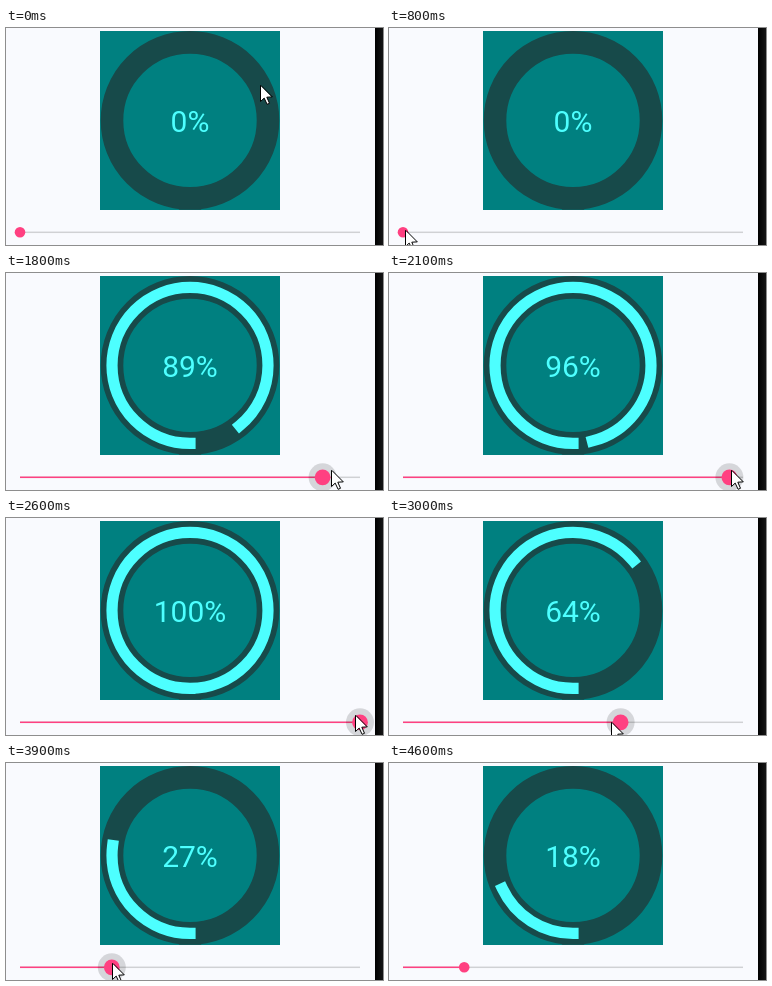
Animation, 377 px wide and 217 px high, one loop 5 s. Source, as an HTML page with a canvas:

```html
<!DOCTYPE html>
<html lang="en">
<head>
<meta charset="utf-8">
<title>Progress ring with slider</title>
<style>
  html, body { margin: 0; width: 100%; height: 100%; overflow: hidden; background: #f9fafe; }
  canvas { display: block; width: 377px; height: 217px; }
</style>
</head>
<body>
<canvas id="stage" width="377" height="217"></canvas>
<script>
const ctx = document.getElementById('stage').getContext('2d');
const W = 377, H = 217, LOOP = 5000, STEP = 100;
const CX = 184, CY = 92.4, RADIUS = 78;
const TRACK = { x: 14, y: 204.3, w: 340 };
const CYAN = '#4dffff', PINK = '#ff4081';
const GRAB = 800, RELEASE = 4200;

// Turning points of the drag: pointer lead is measured from the thumb
const drag = [
  { t: 900, percent: 0, lead: 2, y: 202 },
  { t: 1400, percent: 48, lead: 8, y: 199 },
  { t: 1500, percent: 38, lead: 4, y: 199 },
  { t: 1800, percent: 89, lead: 8, y: 197 },
  { t: 2300, percent: 100, lead: -3, y: 197 },
  { t: 2600, percent: 100, lead: -5, y: 197 },
  { t: 3000, percent: 64, lead: -9.6, y: 204 },
  { t: 3400, percent: 32, lead: -8, y: 202 },
  { t: 3600, percent: 32, lead: -8, y: 202 },
  { t: 3900, percent: 27, lead: 0, y: 200 },
  { t: RELEASE, percent: 18, lead: -2, y: 198 }
];

const mix = (a, b, u) => a + (b - a) * u;
const ramp = (t, from, to) => Math.min(1, Math.max(0, (t - from) / (to - from)));
const smoother = u => u * u * u * (u * (6 * u - 15) + 10);
const thumbX = percent => TRACK.x + TRACK.w * percent / 100;

function dragAt(t, key) {
  const n = Math.max(1, drag.findIndex(k => k.t >= t));
  const end = t > RELEASE ? drag.length - 1 : n;
  const a = drag[end - 1], b = drag[end];
  return mix(a[key], b[key], ramp(t, a.t, b.t));
}

const percentAt = t => Math.round(dragAt(t, 'percent'));

function pointerAt(t) {
  if (t < GRAB) {
    const u = smoother(ramp(t, 0, 700));
    return [mix(254, 16, u), mix(57, 202, u)];
  }
  const x = thumbX(percentAt(t)) + dragAt(t, 'lead');
  const y = dragAt(t, 'y');
  // After release the pointer speeds up and leaves the stage
  const u = Math.max(0, (t - RELEASE) / 300) ** 2;
  return [mix(x, 366, u), mix(y, 64, u)];
}

function disc(x, y, r, color) {
  ctx.fillStyle = color;
  ctx.beginPath();
  ctx.arc(x, y, r, 0, Math.PI * 2);
  ctx.fill();
}

function bar(from, to, color) {
  ctx.fillStyle = color;
  ctx.fillRect(from, TRACK.y - 0.75, to - from, 1.5);
}

function arc(percent, width, color) {
  const start = Math.PI / 2;
  ctx.strokeStyle = color;
  ctx.lineWidth = width;
  ctx.lineCap = 'square';
  ctx.beginPath();
  ctx.arc(CX, CY, RADIUS, start, start + Math.PI * 2 * percent / 100);
  ctx.stroke();
}

function drawBackground() {
  ctx.fillStyle = '#f9fafe';
  ctx.fillRect(0, 0, W, H);
  const edge = ctx.createLinearGradient(369, 0, W, 0);
  edge.addColorStop(0, '#000');
  edge.addColorStop(1, '#161616');
  ctx.fillStyle = edge;
  ctx.fillRect(369, 0, W - 369, H);
}

function drawRing(percent) {
  ctx.fillStyle = '#008080';
  ctx.fillRect(94, 3, 180, 179);
  arc(100, 22.6, '#174a4a');
  if (percent > 0) arc(percent, 11.2, CYAN);
  ctx.fillStyle = CYAN;
  ctx.font = '30px Roboto, sans-serif';
  ctx.textAlign = 'center';
  ctx.fillText(percent + '%', CX, 104.3);
}

function drawSlider(percent, press) {
  const x = thumbX(percent);
  bar(TRACK.x, TRACK.x + TRACK.w, '#d0d1d4');
  bar(TRACK.x, x, PINK);
  disc(x, TRACK.y, 14 * press, 'rgba(0, 0, 0, 0.14)');
  disc(x, TRACK.y, 5.3 + 2.6 * press, PINK);
}

function drawPointer(x, y) {
  const outline = [[0, 0], [0, 16], [3.7, 12.6], [6.6, 18.8], [9, 17.8], [6.3, 11.7], [11.3, 11.4]];
  ctx.beginPath();
  outline.forEach(([px, py]) => ctx.lineTo(x + 0.5 + px, y + 0.5 + py));
  ctx.closePath();
  ctx.fillStyle = '#fff';
  ctx.fill();
  ctx.strokeStyle = '#000';
  ctx.lineWidth = 1;
  ctx.lineJoin = 'round';
  ctx.stroke();
}

function draw(t) {
  const percent = percentAt(t);
  const press = ramp(t, 900, 1100) - ramp(t, RELEASE, RELEASE + 200);
  drawBackground();
  drawRing(percent);
  drawSlider(percent, press);
  drawPointer(...pointerAt(t).map(Math.round));
}

const begin = performance.now();
function tick() {
  const t = (performance.now() - begin) % LOOP;
  draw(Math.floor(t / STEP) * STEP);
  requestAnimationFrame(tick);
}
tick();
</script>
</body>
</html>
```
